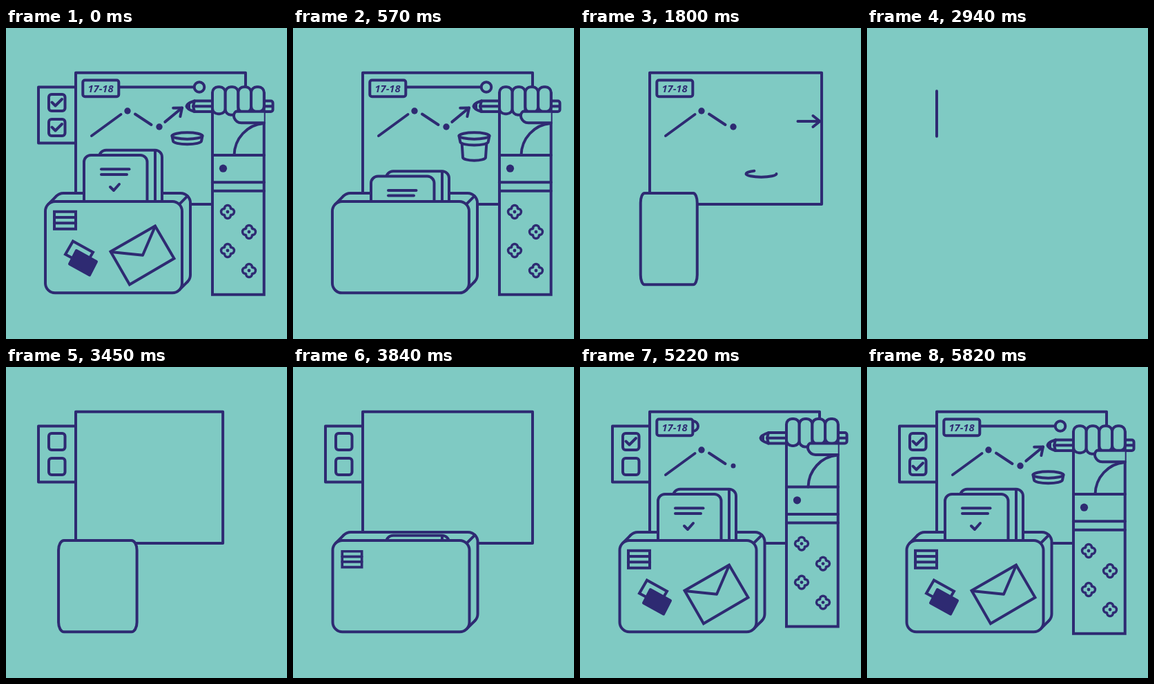
Animation, 407 px wide and 450 px high, one loop 5.85 s. Source, as an HTML page with a canvas:

```html
<!DOCTYPE html>
<html lang="en">
<head>
<meta charset="utf-8">
<title>Desk loop</title>
<style>
html, body { margin: 0; width: 100%; height: 100%; overflow: hidden; background: #7fcac3; }
canvas { display: block; width: 407px; height: 450px; }
</style>
</head>
<body>
<canvas id="stage"></canvas>
<script>
const W = 407, H = 450, LOOP = 5850;
const BG = '#7fcac3', INK = '#2e2a72';
const canvas = document.getElementById('stage');
const dpr = window.devicePixelRatio || 1;
canvas.width = Math.round(W * dpr);
canvas.height = Math.round(H * dpr);
const c = canvas.getContext('2d');

// Timing helpers
const span = (t, a, b) => Math.min(1, Math.max(0, (t - a) / (b - a)));
const mix = (a, b, k) => a + (b - a) * k;
const inBack = (x, s = 0.9) => x * x * (x - s * (1 - x));
const outBack = (x, s = 0.9) => 1 - inBack(1 - x, s);
const inOut = x => x * x * (3 - 2 * x);
// 1 at rest, leaves during a..b, returns during d..e
const show = (t, a, b, d, e, s = 0.9) =>
  t < (b + d) / 2 ? 1 - inBack(span(t, a, b), s) : outBack(span(t, d, e), s);
const trim = (t, a, b, d, e) =>
  t < (b + d) / 2 ? 1 - inOut(span(t, a, b)) : inOut(span(t, d, e));

// Drawing helpers
function ink(fill) {
  if (fill) { c.fillStyle = fill; c.fill(); }
  c.stroke();
}
function path(pts, close) {
  c.beginPath();
  pts.forEach(([x, y]) => c.lineTo(x, y));
  if (close) c.closePath();
}
function line(...pts) { path(pts); c.stroke(); }
function poly(pts, fill) { path(pts, true); ink(fill); }
function box(x, y, w, h, r, fill) {
  c.beginPath();
  c.roundRect(x, y, w, h, r);
  ink(fill);
}
function clip(x, y, w, h) {
  c.beginPath();
  c.rect(x, y, w, h);
  c.clip();
}
function dot(x, y, r) {
  if (r <= 0.05) return;
  c.beginPath();
  c.arc(x, y, r, 0, 7);
  c.fillStyle = INK;
  c.fill();
}
function partLine(k, ...pts) {
  if (k <= 0) return;
  let len = 0;
  for (let i = 1; i < pts.length; i++)
    len += Math.hypot(pts[i][0] - pts[i - 1][0], pts[i][1] - pts[i - 1][1]);
  if (k < 1) c.setLineDash([len * k, 999]);
  line(...pts);
  c.setLineDash([]);
}
function scaled(x, y, k, draw) {
  if (k <= 0.01) return;
  c.save();
  c.translate(x, y);
  c.scale(k, k);
  c.translate(-x, -y);
  draw();
  c.restore();
}

function panel(t) {
  const k = show(t, 200, 560, 3090, 3400);
  if (k <= 0.01) return;
  c.save();
  clip(0, 0, 101, H);
  c.translate(58 * (1 - k), 0);
  box(47, 85.5, 60, 81, 0, BG);
  [[96, trim(t, 60, 220, 4150, 4330)], [132, trim(t, 30, 190, 5250, 5550)]].forEach(([y, tick]) => {
    box(62, y, 23.5, 24, 4);
    partLine(tick, [66.5, y + 11.5], [71.5, y + 16.5], [81, y + 7]);
  });
  c.restore();
}

function edge(t) {
  let top, bottom;
  if (t < 2700) {
    const k = inOut(span(t, 2360, 2690));
    if (k >= 1) return;
    top = mix(65, 110, k);
    bottom = mix(255, 110, k);
  } else {
    const x = span(t, 2705, 3070);
    if (x <= 0) return;
    top = mix(110, 65, x ** 2);
    bottom = mix(110, 255, x ** 2.6);
  }
  line([101, top], [101, bottom]);
}

function tag(t) {
  const slide = t < 3000 ? 1 - span(t, 700, 1330) ** 3 : inOut(span(t, 5100, 5700));
  if (slide > 0) {
    const x = mix(150, 280, slide);
    if (x > 166) line([155, 85.5], [x - 8, 85.5]);
    c.beginPath();
    c.arc(x, 85.5, 7.3, 0, 7);
    ink(BG);
  }
  scaled(137, 87.3, show(t, 1820, 2120, 4710, 5020, 1.7), () => {
    box(111.3, 75.6, 52, 23.6, 3, BG);
    c.fillStyle = INK;
    c.font = "italic 700 14.6px 'Open Sans', 'Noto Sans', sans-serif";
    c.textAlign = 'center';
    c.fillText('17-18', 137, 93);
  });
}

function chart(t) {
  partLine(trim(t, 1950, 2200, 4800, 5000), [124, 156], [166.5, 125]);
  dot(176, 120, 4.7 * show(t, 1900, 2100, 4960, 5120));
  partLine(trim(t, 1850, 2050, 5060, 5220), [187, 124.5], [210.5, 140]);
  dot(222, 143, 4.7 * show(t, 1810, 2000, 5180, 5330));

  const fly = Math.max(0, (t - 1400) / 400);
  const drawn = t < 3000 ? 1 : inOut(span(t, 5280, 5560));
  if (drawn <= 0 || (t < 3000 && fly > 1.6)) return;
  const k = t < 3000 ? fly : 0, turn = Math.min(1, k);
  c.save();
  c.translate(255 + 92 * k * k - 25 * (1 - drawn), 115.5 + 19.5 * inOut(turn) + 20.5 * (1 - drawn));
  c.rotate(-0.69 * (1 - inOut(turn)));
  line([-32 * drawn, 0], [0, 0]);
  line([-10 * drawn, -8 * drawn], [0, 0], [-10 * drawn, 8 * drawn]);
  c.restore();
}

function cup(t) {
  const x = 262.5;
  let ring = 1, top = 156, lid = 7.5, body = 0;
  if (t < 3000) {
    const grow = inOut(span(t, 250, 900)), fall = inOut(span(t, 1290, 1700));
    body = grow;
    top = mix(156, 211, fall);
    lid = mix(7.5, 10, grow) * (1 - fall);
    ring = 1 - span(t, 1700, 2010);
  } else {
    ring = inOut(span(t, 5250, 5500));
    lid = 7.5 * inOut(span(t, 5480, 5700));
  }
  if (ring <= 0) return;
  const low = top + lid;
  if (body > 0 && low < 209) {
    const end = mix(low, 211, body), inset = 3 * (end - low) / 45;
    c.beginPath();
    c.moveTo(x - 18, low);
    c.lineTo(x - 18 + inset, end);
    c.ellipse(x, end, 18 - inset, 4.2, 0, Math.PI, 0, true);
    c.lineTo(x + 18, low);
    ink(BG);
  }
  if (lid > 0.2) {
    c.beginPath();
    c.moveTo(x - 22, top);
    c.ellipse(x, low, 22 - lid * 0.2, 4.8, 0, Math.PI, 0, true);
    c.lineTo(x + 22, top);
    ink(BG);
  }
  c.beginPath();
  c.ellipse(x, top, 22, 4.7, 0, 0, Math.PI * 2 * ring);
  ink(ring === 1 ? BG : null);
}

function board(t) {
  const k = t < 2700 ? 1 - inBack(span(t, 1710, 2360)) : 1 - (1 - span(t, 3060, 3860)) ** 3;
  if (k <= 0) { edge(t); return; }
  const w = 246 * k;
  box(101, 64.7, w, 190.3, 0, BG);
  c.save();
  clip(101, 62, w + 2, 195);
  tag(t);
  chart(t);
  cup(t);
  c.restore();
}

function pages(t) {
  const k = show(t, 250, 650, 3830, 4180);
  if (k <= 0.01) return;
  c.save();
  c.translate(0, 76 * (1 - k));
  box(135, 176.7, 91, 90, 10, BG);
  line([216, 178], [216, 262]);
  box(113, 184, 91.5, 82, 10, BG);
  line([138, 204.3], [178.5, 204.3]);
  line([138, 212], [175, 212]);
  partLine(trim(t, 50, 200, 4340, 4600), [151, 230], [156, 235], [164, 226]);
  c.restore();
}

function stickers(t) {
  scaled(85, 278, show(t, 60, 360, 3720, 4020), () => {
    c.lineJoin = 'miter';
    box(70, 265.7, 31, 25, 0);
    line([70, 274], [101, 274]);
    line([70, 282.3], [101, 282.3]);
    c.lineJoin = 'round';
  });
  scaled(109, 333, show(t, 130, 430, 3850, 4150), () => {
    c.lineJoin = 'miter';
    poly([[97, 308.5], [126, 324.5], [115, 343], [86, 327.5]]);
    c.lineJoin = 'round';
    poly([[102, 322], [131, 338], [121, 357.5], [92, 341.5]], INK);
  });
  scaled(198, 329, show(t, 200, 520, 4020, 4420), () => {
    c.lineJoin = 'miter';
    poly([[216, 286.5], [243.5, 333.5], [179, 371.3], [151.5, 323.5]]);
    c.lineJoin = 'round';
    line([152, 324], [198, 328.8], [216, 287]);
  });
}

function folder(t) {
  const k = t < 2600 ? 1 - inBack(span(t, 1350, 1865)) : outBack(span(t, 3350, 3815), 0.4);
  if (k <= 0.01) return;
  const depth = show(t, 520, 1130, 3600, 3950, 0.5);
  const fx = t < 2600 ? 69 - 12 * depth : 57.5;
  const fy = t < 2600 ? 239 + 12 * depth : 251;
  const d = 12 * depth, w = 198, h = 132.3, r = 14, q = r * 0.293;
  const sx = x => 101 + (x - 101) * k;
  const shell = (x, y) => {
    c.save();
    c.translate(101 * (1 - k), 0);
    c.scale(k, 1);
    c.beginPath();
    c.roundRect(x, y, w, h, r);
    c.restore();
    ink(BG);
  };
  if (depth > 0.01) {
    shell(fx + d, fy - d);
    const tl = [sx(fx + q), fy + q], tlb = [sx(fx + q + d), fy + q - d];
    const br = [sx(fx + w - q), fy + h - q], brb = [sx(fx + w - q + d), fy + h - q - d];
    path([tl, tlb, brb, br], true);
    c.fillStyle = BG;
    c.fill();
    line(tl, tlb);
    line(br, brb);
    line([br[0], tl[1]], [brb[0], tlb[1]]);
    pages(t);
  }
  shell(fx, fy);
  stickers(t);
}

function flower(x, y) {
  const petals = (r, color) => {
    c.fillStyle = color;
    [[5, 0], [-5, 0], [0, 5], [0, -5]].forEach(([a, b]) => {
      c.beginPath();
      c.arc(x + a, y + b, r, 0, 7);
      c.fill();
    });
  };
  petals(6.2, INK);
  petals(2.7, BG);
  c.beginPath();
  c.arc(x, y, 4.8, 0, 7);
  c.fill();
  dot(x, y, 2.4);
}

function pencil() {
  c.beginPath();
  c.moveTo(300, 105.5);
  c.lineTo(273, 105.5);
  c.quadraticCurveTo(262, 109, 261.5, 113.2);
  c.quadraticCurveTo(262, 117.5, 273, 121);
  c.lineTo(300, 121);
  ink(BG);
  line([273, 105.5], [271, 113.2], [273, 121]);
  line([272, 113.2], [299, 113.2]);
  poly([[262, 113.2], [265, 110.5], [265, 116]], INK);
  box(366, 105.5, 20.5, 15.5, 3, BG);
  line([374, 113.2], [386, 113.2]);
}

function arm(t) {
  const k = t < 3000 ? inBack(span(t, 800, 1715), 0.82) : 1 - outBack(span(t, 4800, 5380), 1);
  if (k >= 1) return;
  c.save();
  clip(0, 0, W, 388);
  c.translate(0, 307 * k);
  pencil();
  c.fillStyle = BG;
  c.fillRect(299, 100, 75, 286);
  c.lineJoin = 'miter';
  line([299, 116], [299, 385.8], [373.7, 385.8], [373.7, 94]);
  c.lineJoin = 'round';
  [184, 223.3, 235.8].forEach(y => line([299, y], [373.7, y]));
  c.beginPath();
  c.moveTo(330.5, 184);
  c.bezierCurveTo(331, 160, 349, 140, 373, 138);
  c.stroke();
  [39, 40.5, 37, 36].forEach((h, i) => box(299 + 18.7 * i, 85.3, 18.7, h, 8, BG));
  c.beginPath();
  c.moveTo(373.7, 120.8);
  c.lineTo(333, 120.8);
  c.quadraticCurveTo(328.5, 124, 330.5, 130);
  c.quadraticCurveTo(333.5, 137.3, 341, 137.3);
  c.lineTo(373.7, 137.3);
  ink(BG);
  dot(314.5, 203.2, 5.6);
  [[321, 266], [352, 295], [321, 322], [352, 351]].forEach(([x, y]) => flower(x, y));
  c.restore();
}

function draw(t) {
  c.setTransform(dpr, 0, 0, dpr, 0, 0);
  c.fillStyle = BG;
  c.fillRect(0, 0, W, H);
  c.strokeStyle = INK;
  c.lineWidth = 4;
  c.lineCap = c.lineJoin = 'round';
  panel(t);
  board(t);
  folder(t);
  arm(t);
}

const start = performance.now();
function tick() {
  draw((performance.now() - start) % LOOP);
  requestAnimationFrame(tick);
}
tick();
</script>
</body>
</html>
```
